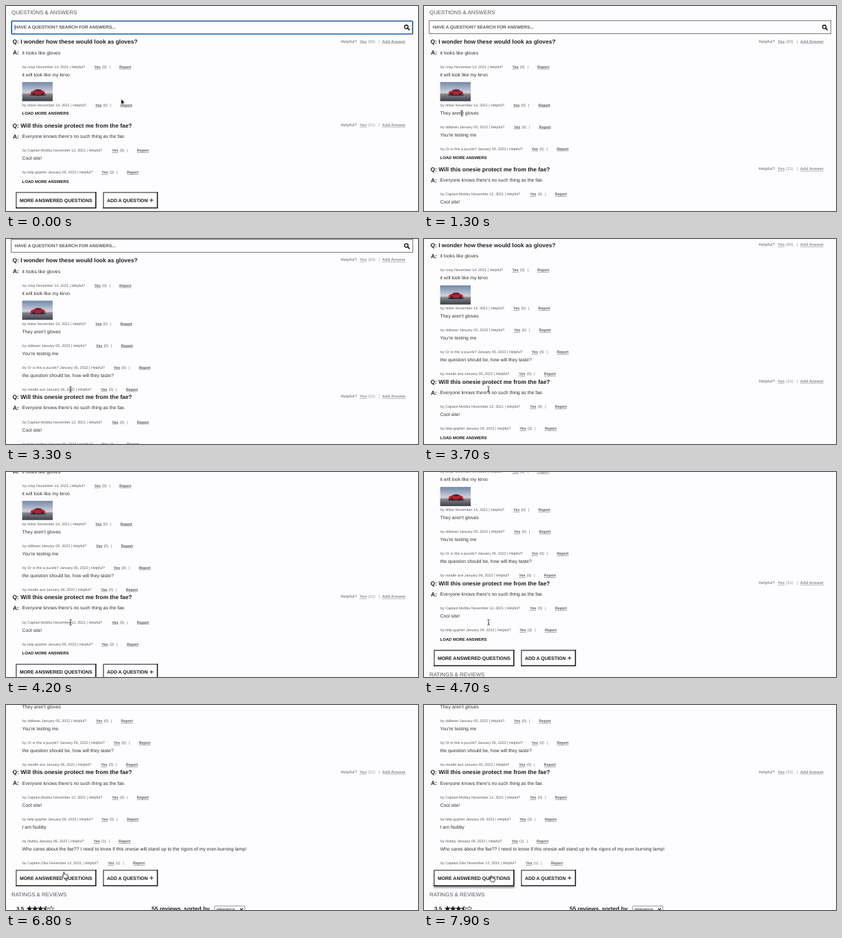
An HTML page that plays this animation: 600 by 300 pixels, repeating every 8 s.

```html
<!DOCTYPE html>
<html lang="en">
<head>
<meta charset="utf-8">
<title>Questions and answers</title>
<style>
html, body { margin: 0; width: 100%; height: 100%; overflow: hidden; background: #fdfcfe; }
svg { display: block; width: 600px; height: 300px; }
text {
  font-family: "Liberation Sans", Arial, sans-serif;
  text-rendering: geometricPrecision;
  white-space: pre;
}
.bold { font-weight: bold; }
.link { font-weight: bold; text-decoration: underline; }
</style>
</head>
<body>
<svg id="stage" viewBox="0 0 600 300">
  <defs>
    <linearGradient id="sky" x2="0" y2="1">
      <stop offset="0" stop-color="#7488a8"/>
      <stop offset=".3" stop-color="#a3b0c6"/>
      <stop offset=".55" stop-color="#d3d3d8"/>
      <stop offset=".64" stop-color="#85858c"/>
      <stop offset="1" stop-color="#3a3f47"/>
    </linearGradient>
    <filter id="blur" x="-10%" y="-30%" width="120%" height="170%">
      <feGaussianBlur stdDeviation="1.3"/>
    </filter>
  </defs>
</svg>
<script>
const LOOP = 8000;
const stage = document.getElementById("stage");

function add(parent, tag, attrs = {}) {
  const el = document.createElementNS("http://www.w3.org/2000/svg", tag);
  for (const key in attrs) el.setAttribute(key, attrs[key]);
  parent.appendChild(el);
  return el;
}
const group = parent => add(parent, "g");
const path = (parent, d, attrs) => add(parent, "path", { d, fill: "none", ...attrs });

// y is the middle of the capital letters
function write(parent, x, y, size, str, fill, cls = "") {
  const el = add(parent, "text", { x, y: y + size * 0.36, "font-size": size, fill, class: cls });
  el.textContent = str;
}

function question(parent, y, str, votes) {
  const grey = "#8f8e91";
  write(parent, 9.5, y, 8.44, "Q: " + str, "#1f1f1f", "bold");
  write(parent, 10, y + 16, 8.44, "A:", "#1f1f1f", "bold");
  write(parent, 487.5, y - 0.8, 5.9, "Helpful?", grey, "bold");
  write(parent, 515, y - 0.8, 5.9, "Yes", grey, "link");
  write(parent, 527.3, y - 0.8, 5.9, `(${votes})`, grey);
  write(parent, 543, y - 0.8, 5.9, "|", grey);
  write(parent, 547.8, y - 0.8, 5.9, "Add Answer", grey, "link");
}

const answer = (parent, y, str) => write(parent, 23.5, y, 6.92, str, "#333");

function byline(parent, y, who, date, x, votes) {
  const grey = "#5c5c5e";
  write(parent, 24, y, 5.36, `by ${who} ${date} | Helpful?`, grey);
  write(parent, x, y, 5.36, "Yes", grey, "link");
  write(parent, x + 11.5, y, 5.36, `(${votes})`, grey);
  write(parent, x + 22, y, 5.36, "|", grey);
  write(parent, x + 36.6, y, 5.36, "Report", grey, "link");
}

const loadMore = (parent, y) => write(parent, 23.5, y, 5.95, "LOAD MORE ANSWERS", "#1a1a1a", "bold");

function button(parent, left, right, str) {
  add(parent, "rect", { x: left, y: -12, width: right - left, height: 24, fill: "#fdfcfe" });
  path(parent, `M${left + .7} 12V-11.3H${right}`, { stroke: "#4a4a4a", "stroke-width": 1.3 });
  path(parent, `M${left} 11.3H${right - .7}V-12`, { stroke: "#111", "stroke-width": 1.5 });
  write(parent, left + 5.7, 0, 6.94, str, "#1a1a1a", "bold");
}

function star(cx, cy, r) {
  let d = "";
  for (let i = 0; i < 10; i++) {
    const a = i * Math.PI / 5, k = i % 2 ? r * 0.42 : r;
    d += `${i ? "L" : "M"}${(cx + k * Math.sin(a)).toFixed(2)} ${(cy - k * Math.cos(a)).toFixed(2)}`;
  }
  return d + "Z";
}

const page = group(stage);

// Search
write(page, 8, 9.3, 7.88, "QUESTIONS & ANSWERS", "#58575a");
const plainBox = add(page, "rect", { x: 7.5, y: 21.5, width: 585, height: 19, fill: "none", stroke: "#7a7a7c", "stroke-width": 1 });
const focusBox = group(page);
add(focusBox, "rect", { x: 8.2, y: 22, width: 584, height: 19, rx: 1, fill: "none", stroke: "#1d5f9f", "stroke-width": 1.7 });
path(focusBox, "M13 27.5V35.5", { stroke: "#222", "stroke-width": .7 });
write(page, 12.7, 31, 6.44, "HAVE A QUESTION? SEARCH FOR ANSWERS...", "#59585b", "bold");
add(page, "circle", { cx: 583, cy: 30.6, r: 2.6, fill: "none", stroke: "#111", "stroke-width": 1.3 });
path(page, "M585 32.6L587.3 34.9", { stroke: "#111", "stroke-width": 1.6, "stroke-linecap": "round" });

// First question
question(page, 52.2, "I wonder how these would look as gloves?", 60);
answer(page, 68.1, "it looks like gloves");
byline(page, 88.9, "crisp", "November 14, 2021", 128.5, 0);
answer(page, 100.1, "it will look like my kirvo");
add(page, "rect", { x: 23.5, y: 111.3, width: 44.5, height: 28, fill: "url(#sky)" });
add(page, "ellipse", { cx: 46.5, cy: 130.3, rx: 12, ry: 1.1, fill: "#2a2c33" });
path(page, "M36 129.3V126.2Q37 124.6 40 124.2Q43 121.8 47 121.8Q51 121.8 53.5 124.2Q57 125.2 57 127.4V129.3Z", { fill: "#b3202f" });
path(page, "M41 124.4Q43.8 122.5 47 122.5Q50.2 122.5 52 124.4Z", { fill: "#3d2630" });
for (const cx of [40.3, 52.8]) add(page, "circle", { cx, cy: 128.9, r: 1.6, fill: "#25222a" });
byline(page, 144.7, "tinker", "November 14, 2021", 130, 0);

const moreA = group(page);
answer(moreA, 156.1, "They aren't gloves");
byline(moreA, 176.7, "oldbean", "January 05, 2022", 131, 0);
answer(moreA, 188.1, "You're testing me");
byline(moreA, 208.8, "Or is this a puzzle?", "January 05, 2022", 156.8, 0);
const moreB = group(page);
answer(moreB, 220.1, "the question should be, how will they taste?");
byline(moreB, 240.8, "noodle ace", "January 06, 2022", 138.2, 0);
const loadA = group(page);
loadMore(loadA, 157.3);

// Second question
const second = group(page);
question(second, 0, "Will this onesie protect me from the fae?", 31);
answer(second, 16, "Everyone knows there's no such thing as the fae.");
byline(second, 36.7, "Captain Mobbu", "November 12, 2021", 154.2, 5);
answer(second, 48.2, "Cool site!");
byline(second, 68.9, "kelp-gopher", "January 09, 2022", 139.3, 3);
const moreC = group(second);
answer(moreC, 80.3, "I am Nubby");
byline(moreC, 101, "Nubby", "January 06, 2022", 127.5, 1);
answer(moreC, 112.4, "Who cares about the fae?? I need to know if this onesie will stand up to the rigors of my ever-burning lamp!");
byline(moreC, 133, "Captain Zibo", "November 12, 2021", 148.3, 1);
const loadB = group(second);
loadMore(loadB, 82.2);

// Buttons and reviews
const foot = group(second);
const shadow = add(foot, "rect", { x: 14, y: -10.5, width: 118, height: 25, fill: "#000", filter: "url(#blur)" });
button(foot, 14.2, 131.5, "MORE ANSWERED QUESTIONS");
button(foot, 141.2, 221.2, "ADD A QUESTION");
path(foot, "M209.3 0H214.5M211.9 -2.6V2.6", { stroke: "#222", "stroke-width": 1 });
write(foot, 8, 23.6, 7.88, "RATINGS & REVIEWS", "#58575a");
write(foot, 15, 45.2, 8, "3.5", "#1f1f1f", "bold");
for (let i = 0; i < 5; i++) {
  const cx = 34.2 + i * 8;
  path(foot, star(cx, 45.2, 4), { fill: i < 3 ? "#111" : "none", stroke: "#111", "stroke-width": .6 });
  if (i === 3) path(foot, `M${cx} 41.2L${cx - 1} 43.9L${cx - 3.8} 44L${cx - 1.6} 45.7L${cx - 2.4} 48.4L${cx} 46.9Z`, { fill: "#111" });
}
write(foot, 212, 45.2, 8.4, "55 reviews, sorted by", "#1f1f1f", "bold");
add(foot, "rect", { x: 303.8, y: 41, width: 44, height: 9.5, rx: 1, fill: "#fff", stroke: "#666", "stroke-width": .7 });
write(foot, 306.5, 45.8, 6.2, "relevance", "#111");
path(foot, "M341 44.6L343 46.8L345 44.6", { stroke: "#111", "stroke-width": 1.1 });

// Pointers, each with its hot spot at 0,0
const pointer = group(stage);
const shapes = {
  arrow: path(pointer, "M0 0V8L1.9 6.3L3.1 9L4.4 8.4L3.2 5.8H5.8Z", { fill: "#111", stroke: "#fff", "stroke-width": .6 }),
  beam: path(pointer, "M-1.8 -4Q0 -4 0 -3V3Q0 4 -1.8 4M1.8 -4Q0 -4 0 -3M0 3Q0 4 1.8 4M-.9 .9H.9", { stroke: "#222", "stroke-width": .8 }),
  hand: path(pointer, "M-1 .8Q-1 0 -.2 0Q.7 0 .7 .8V3.3Q2 2.8 2.4 3.7Q3.6 3.2 4 4.1Q5.4 3.8 5.4 5V6.5Q5.2 8 4.4 9H.2Q-1.4 7.2 -2.8 5.6Q-2.6 4.2 -1 5.4Z", { fill: "#fff", stroke: "#111", "stroke-width": .8 })
};

// Rows: time, value
const scrollKeys = [
  [2800, 0], [2900, 1], [3100, 9], [3400, 27], [3700, 43.4], [4100, 64], [4500, 84], [4700, 89.4],
  [5400, 89.4], [5600, 94], [5800, 101], [6000, 110.6], [6100, 136], [6200, 153.6]
];
const xKeys = [[50, 167.5], [850, 55], [1350, 55], [2350, 94], [4700, 94], [5200, 71.5], [6600, 71.5], [7000, 97.5], [7700, 97.5], [7900, 98]];
const yKeys = [[50, 136], [850, 157], [1350, 157], [2350, 220], [4700, 220], [5200, 239.5], [6600, 239.5], [7000, 249.3], [7700, 249.3], [7900, 249.8]];
const shapeKeys = [[0, "arrow"], [1000, "beam"], [1500, "arrow"], [2500, "beam"], [4800, "arrow"], [6800, "hand"]];

const linear = p => p;
const smooth = p => p * p * (3 - 2 * p);

function valueAt(keys, t, ease) {
  const i = keys.findIndex(k => k[0] > t);
  if (i === 0) return keys[0][1];
  if (i < 0) return keys[keys.length - 1][1];
  const [t0, v0] = keys[i - 1], [t1, v1] = keys[i];
  return v0 + (v1 - v0) * ease((t - t0) / (t1 - t0));
}

const show = (el, on) => el.setAttribute("visibility", on ? "visible" : "hidden");
const move = (el, x, y) => el.setAttribute("transform", `translate(${x.toFixed(2)} ${y.toFixed(2)})`);

function draw(t) {
  const opened = t < 1000 ? 0 : t < 2500 ? 1 : 2;
  const openedB = t >= 5300;
  const focused = t < 900;

  show(focusBox, focused);
  show(plainBox, !focused);
  show(moreA, opened > 0);
  show(moreB, opened > 1);
  show(loadA, opened < 2);
  show(moreC, openedB);
  show(loadB, !openedB);

  move(loadA, 0, opened * 64.3);
  move(second, 0, [174.5, 238.8, 252][opened]);
  move(foot, 0, openedB ? 154.7 : 109.7);
  move(page, 0, -valueAt(scrollKeys, t, linear));
  shadow.setAttribute("opacity", valueAt([[7200, 0], [7500, .4]], t, linear));

  move(pointer, valueAt(xKeys, t, smooth), valueAt(yKeys, t, smooth));
  const shape = shapeKeys.filter(k => k[0] <= t).pop()[1];
  for (const name in shapes) show(shapes[name], name === shape);
}

const start = performance.now();
function tick() {
  draw((performance.now() - start) % LOOP);
  requestAnimationFrame(tick);
}
tick();
</script>
</body>
</html>
```
